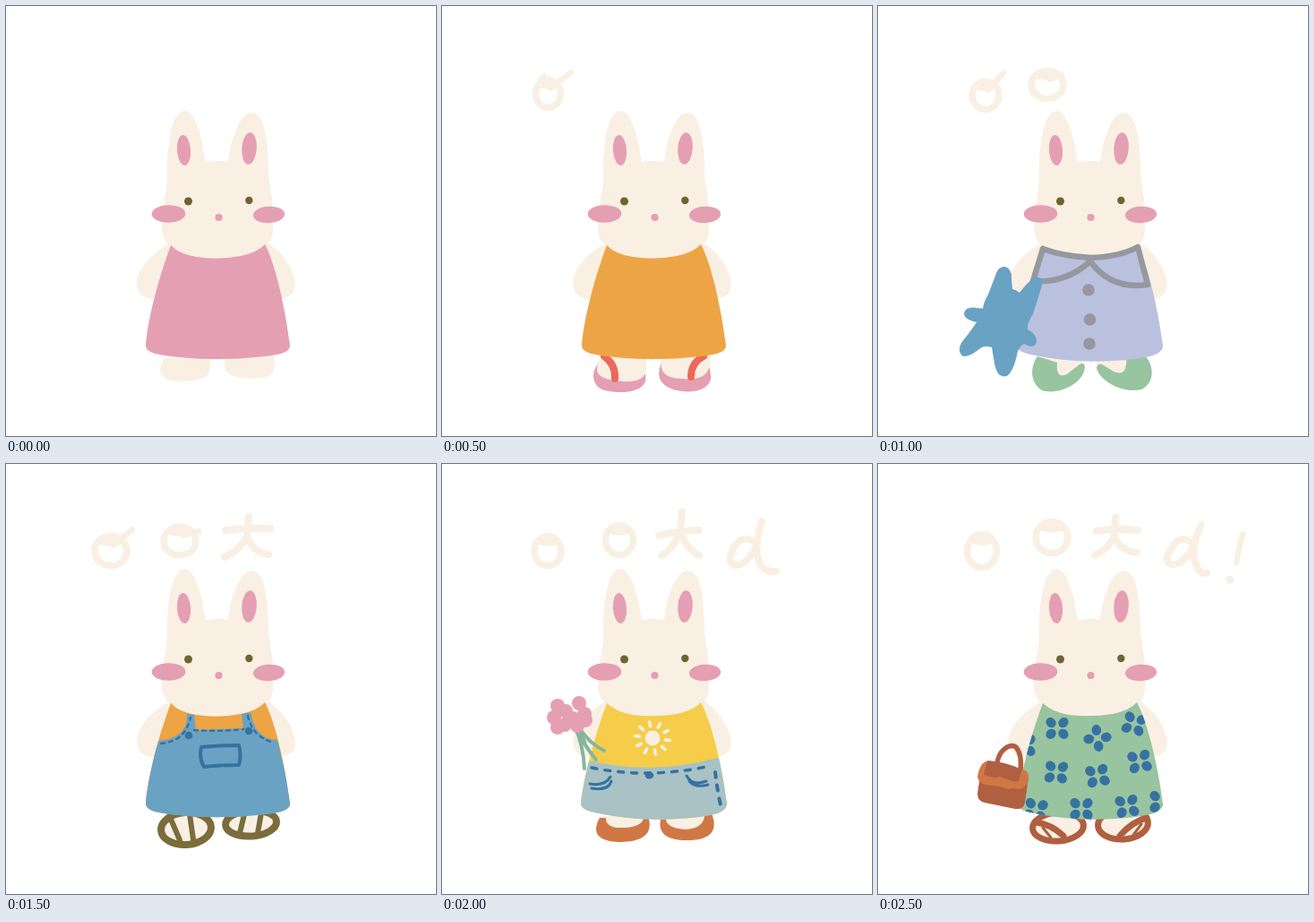
An HTML page that plays this animation: 480 px wide and 480 px high, repeating every 3000 ms.

```html
<!DOCTYPE html>
<html lang="en">
<head>
<meta charset="utf-8">
<title>Rabbit outfits</title>
<style>
html, body { margin: 0; width: 100%; height: 100%; overflow: hidden; background: #fff; }
svg { display: block; width: 100vw; height: 100vh; }
.line { fill: none; stroke-linecap: round; stroke-linejoin: round; }
</style>
</head>
<body>
<svg id="stage" viewBox="0 0 480 480"></svg>
<script>
const C = {
  cream: '#f9f0e3', pink: '#e59fb2', eye: '#6f642f', orange: '#eda445', red: '#ea6a5c',
  lilac: '#bac1df', grey: '#96989f', green: '#98c4a0', blue: '#6aa2c3', navy: '#3672a1',
  olive: '#7b6c3c', yellow: '#f5cd4a', denim: '#a8c2c5', rust: '#d07845', brown: '#b05f41', stem: '#83b79c'
};
const STEP = 500;

const fill = (d, c, more = '') => `<path d="${d}" fill="${c}" ${more}/>`;
const line = (d, c, w, more = '') => `<path class="line" d="${d}" stroke="${c}" stroke-width="${w}" ${more}/>`;
const oval = (x, y, rx, ry, c, turn = 0, more = '') =>
  `<ellipse cx="${x}" cy="${y}" rx="${rx}" ry="${ry}" fill="${c}" transform="rotate(${turn} ${x} ${y})" ${more}/>`;
const dot = (x, y, r, c) => oval(x, y, r, r, c);
const sandal = (x, y, rx, ry, c, w) => oval(x, y, rx, ry, C.cream, -4, `stroke="${c}" stroke-width="${w}"`);
const group = (body, more = '') => `<g ${more}>${body}</g>`;

const DRESS = 'M184 267Q193 277 213 280Q237 284 262 279Q281 275 289 266C301 289 311 334 317 379Q317 386 303 389C262 396 203 396 166 388Q156 385 156 379C158 352 169 307 184 267Z';
const WIDE = 'M184 267Q193 276 213 280Q237 283 262 279Q281 275 289 266C301 289 312 334 318 379Q318 387 304 391C267 399 209 399 166 388Q155 385 155 379C158 352 169 307 184 267Z';

const arms =
  fill('M185 264C161 275 145 296 146 311C148 323 156 328 170 328L195 290Z', C.cream) +
  fill('M288 263C308 271 323 297 323 312C322 322 315 327 303 327L283 286Z', C.cream);
const feet =
  fill('M177 393C169 404 171 415 184 418C198 420 218 419 225 412C229 407 228 398 228 392Z', C.cream) +
  fill('M245 392C242 405 246 412 257 414C271 417 291 417 297 410C301 404 300 396 299 388Z', C.cream);
const head =
  fill('M180 196C179 158 184 118 199 117C213 117 220 155 223 174Q236 172 248 174C250 154 259 120 274 119C290 119 293 155 293 190C298 216 299 232 298 249C298 263 291 270 277 276C252 285 218 284 196 275C180 268 173 260 174 244C176 233 175 223 178 211Z', C.cream) +
  oval(198.5, 161, 7.6, 17, C.pink, -4) + oval(271.5, 159, 8.3, 17.8, C.pink, 4) +
  dot(203.5, 218, 4.5, C.eye) + dot(271.3, 217, 4.2, C.eye) + dot(237.5, 236, 4.1, C.pink) +
  oval(181.5, 232, 18.8, 9.8, C.pink, -1) + oval(293.5, 233, 17.6, 9.3, C.pink, -3);

// Lettering: a ring with a filled lid and an optional tail
function ring(x, y, rx, ry, tail) {
  const a = y - ry * .5;
  const lid = `M${x - rx * .85} ${a}Q${x} ${y - ry * .15} ${x + rx * .85} ${a}Q${x} ${y - ry * 1.5} ${x - rx * .85} ${a}Z`;
  return oval(x, y, rx, ry, 'none', 0, `stroke="${C.cream}" stroke-width="7.5"`) + fill(lid, C.cream) +
    (tail ? line(`M${x + rx * .2} ${y - ry * .4}L${tail}`, C.cream, 6.5) : '');
}
const tee = (x, y, bar, legs) =>
  line(`${bar}M${x} ${y}Q${x - 1} ${y + 14} ${x - 2} ${y + 22}${legs}`, C.cream, 8);
const dee = (bowl, stem) => line(bowl + stem, C.cream, 7.8);

const words = [
  '',
  line('M110 82L114 78', C.cream, 5) + ring(118.5, 98, 14, 15.5, '144 74'),
  ring(120, 100, 15, 15.5, '140 75') + ring(189, 88, 18, 15.5, '205 77'),
  ring(117, 97, 18, 16.5, '141 73') + ring(194, 86, 18, 16, '215 75') +
    tee(271, 59, 'M245 74Q270 71 295 72', 'Q260 97 244 104M269 81Q275 98 293 101'),
  ring(118, 97, 15, 16.5) + ring(198, 85, 15.5, 16.5) +
    tee(268, 53, 'M242 80Q264 74 287 74', 'Q259 95 245 102M266 77Q273 95 287 102') +
    dee('M346 86Q334 79 326 93Q317 108 326 113C337 115 349 99 352 88', 'M357 64Q350 86 352 101Q355 122 373 120'),
  ring(116, 97, 16.5, 18.5) + ring(194, 82, 18, 17.5) +
    tee(265, 59, 'M244 75Q267 71 290 74', 'Q257 95 242 102M263 80Q270 97 289 99') +
    dee('M347 86Q336 80 329 92Q318 107 326 112C339 114 350 99 353 88', 'M361 68Q351 87 353 105Q356 123 367 122') +
    line('M407 78Q402 98 400 110', C.cream, 6.5) + dot(393, 129, 4.5, C.cream)
];

function flipFlops() {
  return fill('M176 398C166 406 166 424 181 429C198 433 223 432 227 419Q228 413 226 408Z', C.pink) +
    fill('M245 399C239 411 242 423 258 428C274 433 296 431 300 417Q301 409 297 400Z', C.pink) +
    fill('M177 393C171 405 170 413 187 417C207 421 227 421 228 405L228 391Z', C.cream) +
    fill('M246 391C242 407 247 415 267 416C289 418 300 413 300 391Z', C.cream) +
    line('M181 391Q194 400 193 416', C.red, 8) + line('M292 391Q278 398 278 414', C.red, 8);
}

function collarDress() {
  const shoes =
    fill('M178 391C169 404 170 421 183 429C202 435 230 421 231 403Q230 397 225 400L211 411Q198 417 200 398Z', C.green) +
    fill('M297 389C309 401 309 421 294 428C274 433 247 419 244 404Q245 399 250 400L263 408Q279 415 277 391Z', C.green);
  const star = 'M131 301Q134 290 142 291Q150 294 149 305L150 316Q155 317 158 320Q167 308 175 303Q185 301 183 312L173 344Q166 354 167 361Q178 367 177 375Q174 384 163 377Q156 381 155 390Q151 408 144 413Q133 416 130 399L127 381Q118 378 113 383Q102 392 95 391Q88 386 93 376Q105 361 110 353Q96 350 96 343Q98 335 110 337L117 338Q118 330 123 322Z';
  return shoes + fill(WIDE, C.lilac) +
    line('M184 271Q205 279 237 281Q270 280 290 269L301 311Q260 317 237 285Q209 310 173 307L184 271', C.grey, 6.5) +
    [[235, 317], [236.5, 350], [236, 377]].map(p => dot(...p, 6.8, C.grey)).join('') + fill(star, C.blue);
}

function overalls() {
  const stitch = 'stroke-dasharray="4 5"';
  return sandal(201, 407, 28, 18, C.olive, 8) + sandal(273.5, 401, 28.5, 14.5, C.olive, 8) +
    line('M183 394L194 420M205 391L209 419M266 391L261 412M285 389L281 412', C.olive, 6) +
    fill(DRESS, C.orange) +
    fill('M168 309Q203 308 202 279L210 280L212 297L265 295L263 279L273 277C277 298 286 307 303 308L325 400L150 400Z', C.blue, 'clip-path="url(#slim)"') +
    line('M173 312Q200 310 206 283M210 297Q238 299 265 296M270 281Q275 305 299 311', C.navy, 2.4, stitch) +
    dot(204, 303, 4.3, C.navy) + dot(271, 298, 4.3, C.navy) +
    line('M218 316Q238 314 260 314Q263 325 260 336Q238 336 221 338Q215 328 218 316Z', C.navy, 4);
}

function denimSkirt() {
  let rays = '';
  for (let i = 0; i < 10; i++) {
    const a = (i * 36 + 8) * Math.PI / 180, u = Math.cos(a), v = Math.sin(a);
    rays += `M${235 + 14.5 * u} ${306 + 13.5 * v}L${235 + 19.5 * u} ${306 + 18 * v}`;
  }
  const shoes =
    fill('M176 395C167 411 173 421 197 422C223 422 235 414 231 396Z', C.rust) +
    fill('M244 397C241 412 250 420 274 420C299 420 309 410 301 390Z', C.rust) +
    fill('M183 394Q182 404 195 406Q223 407 225 395Z', C.cream) +
    fill('M250 395Q249 406 271 408Q293 407 293 391Z', C.cream);
  const blooms = [[125, 283], [129, 270], [138, 276], [137, 291], [146, 284], [153, 267], [159, 279], [151, 292], [129, 294], [160, 286]];
  return shoes + fill(WIDE, C.yellow) +
    fill('M150 327L163 331Q236 348 307 328L325 325L325 405L150 405Z', C.denim, 'clip-path="url(#wide)"') +
    dot(235, 306, 8.4, C.cream) + line(rays, C.cream, 3.6) +
    line('M167 339Q230 352 300 337', C.navy, 3.5, 'stroke-dasharray="6 9"') +
    line('M305 344Q307 362 311 381', C.navy, 4, 'stroke-dasharray="6 9"') +
    oval(231.5, 347.5, 4.8, 4, C.navy) +
    line('M165 357Q182 360 188 349M167 362Q186 365 189 354M273 348Q279 360 295 354M276 354Q283 362 297 358', C.navy, 3) +
    line('M148 292Q158 315 159 340M150 293Q158 314 172 330M153 294Q164 312 181 320', C.stem, 4) +
    line('M149 293L158 310', C.stem, 6) +
    blooms.map(p => dot(...p, 8, C.pink)).join('');
}

function flowerDress() {
  // centre and turn of each four-petal flower
  const spots = [[200, 295, 0], [245, 306, 38], [286, 290, 15], [163, 314, 0], [199, 344, 5], [245, 348, -10],
    [292, 332, -10], [176, 386, 10], [227, 385, 0], [278, 382, -8], [316, 377, 0]];
  const bloom = ([x, y, turn]) => [45, 135, 225, 315].map(k => {
    const t = turn + k, a = t * Math.PI / 180;
    return oval(x + 9.8 * Math.cos(a), y + 9 * Math.sin(a), 6, 5.3, C.navy, t);
  }).join('');
  const shoes = sandal(201, 405, 28.5, 16, C.brown, 7) + sandal(273.5, 402, 28, 17, C.brown, 7) +
    line('M176 400Q193 402 207 415M300 395Q284 399 270 415', C.brown, 7) +
    line('M184 406L193 417M294 402L285 414', C.brown, 3);
  const bag =
    line('M133 335C134 320 147 311 154 316Q161 324 159 343', C.brown, 5.5) +
    fill('M114 348L111 368Q111 376 119 378L153 385Q163 386 164 378L168 350Z', C.brown) +
    fill('M120 332Q113 336 111 349Q112 356 120 358L157 363Q167 361 168 351Q169 342 161 341Z', C.rust) +
    fill('M122 331Q141 332 161 341L157 354Q145 355 130 350L118 347Z', C.brown) +
    line('M135 354L146 358', C.rust, 10);
  return shoes + fill(WIDE, C.green) + group(spots.map(bloom).join(''), 'clip-path="url(#wide)"') + bag;
}

const outfits = [fill(DRESS, C.pink), flipFlops() + fill(DRESS, C.orange), collarDress(), overalls(), denimSkirt(), flowerDress()];

const stage = document.getElementById('stage');
stage.innerHTML =
  `<defs><clipPath id="slim"><path d="${DRESS}"/></clipPath><clipPath id="wide"><path d="${WIDE}"/></clipPath>
  <filter id="chalk" filterUnits="userSpaceOnUse" x="0" y="0" width="480" height="480" color-interpolation-filters="sRGB">
  <feTurbulence type="fractalNoise" baseFrequency=".2" numOctaves="2" seed="4"/>
  <feDisplacementMap in="SourceGraphic" scale="1.4" xChannelSelector="R" yChannelSelector="G"/></filter></defs>` +
  group(arms + feet + head + outfits.map((o, i) => group(o + words[i], 'class="look"')).join(''), 'filter="url(#chalk)"');

const looks = [...stage.querySelectorAll('.look')];
let shown = -1;
function draw(ms) {
  const now = Math.floor(ms / STEP) % looks.length;
  if (now === shown) return;
  shown = now;
  looks.forEach((g, i) => g.setAttribute('display', i === now ? 'inline' : 'none'));
}
const start = performance.now();
function tick() {
  draw(performance.now() - start);
  requestAnimationFrame(tick);
}
tick();
</script>
</body>
</html>
```
